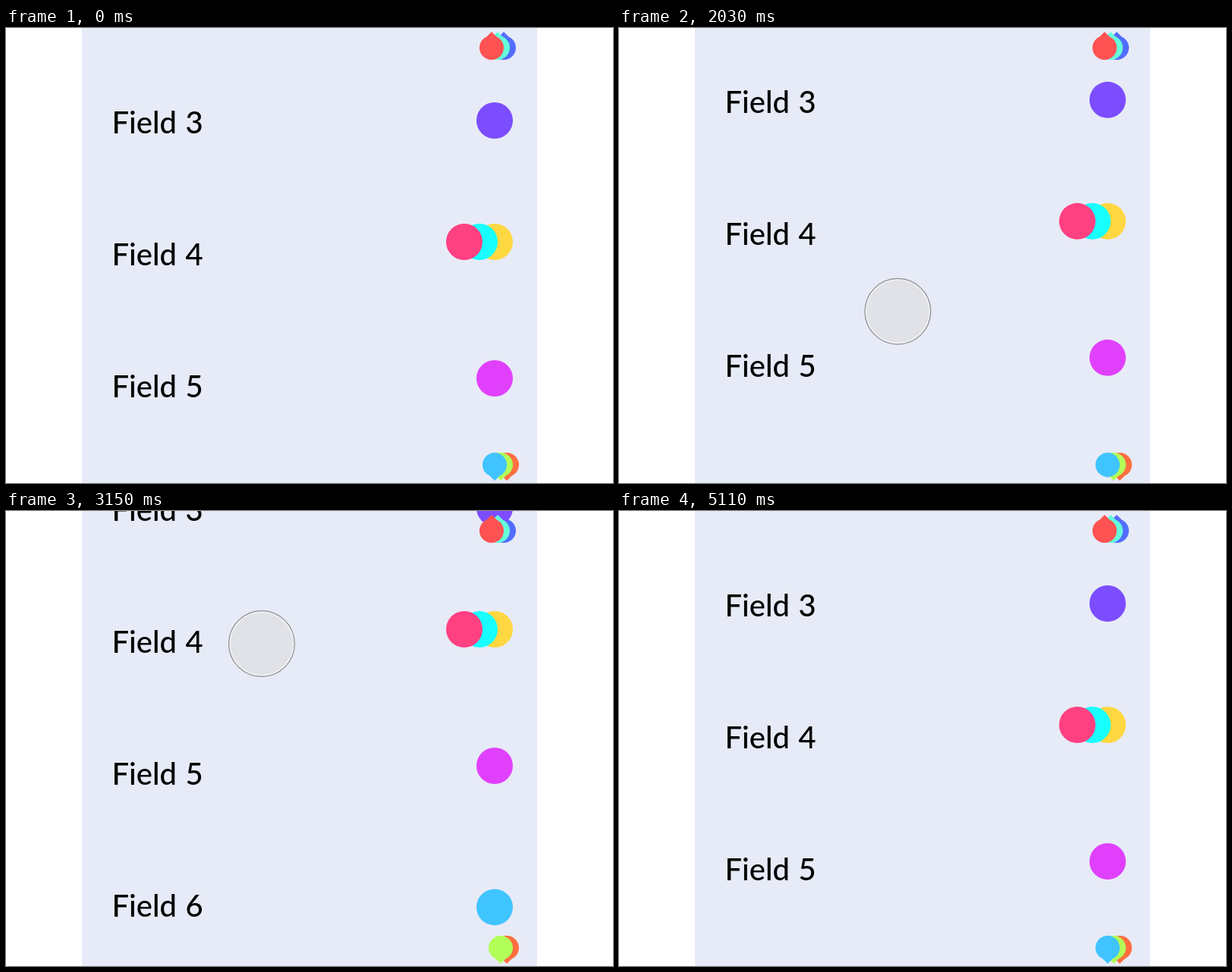
Recreate the animation shown at these times as an HTML page. Size 800 by 600 pixels, loop 6300 ms.

```html
<!DOCTYPE html>
<html lang="en">
<head>
<meta charset="utf-8">
<title>Field list</title>
<style>
  html, body { margin: 0; width: 100%; height: 100%; overflow: hidden; background: #fff; }
  svg { display: block; width: 100vw; height: 100vh; }
  text { font: 500 40px Lato, sans-serif; word-spacing: 1.5px; fill: #000; }
</style>
</head>
<body>
<svg viewBox="0 0 800 600">
  <rect x="100" width="600" height="600" fill="#e7ebf7"/>
  <g class="scroll" id="labels"></g>
  <g id="back"></g>
  <g class="scroll" id="dots"></g>
  <g id="front"></g>
  <g id="touch">
    <circle r="43.4" fill="#ddd" fill-opacity=".62"/>
    <circle r="41.9" fill="none" stroke="#fff" stroke-opacity=".5" stroke-width="2"/>
    <circle r="43.4" fill="none" stroke="#777" stroke-opacity=".8" stroke-width="1.2"/>
  </g>
</svg>
<script>
const LOOP = 6300, TICK = 70;
const PRESS = 1470, RELEASE = 4550, LEAVE = 5110;
const PIN_R = 16, DOT_R = 24, TIP = 21;
const TOP = 26, BOTTOM = 576;

const $ = id => document.getElementById(id);

function add(parent, tag, attrs, text = '') {
  const el = document.createElementNS('http://www.w3.org/2000/svg', tag);
  for (const k in attrs) el.setAttribute(k, attrs[k]);
  el.textContent = text;
  return $(parent).appendChild(el);
}

// Circle of radius r with a right-angled tip reaching up to height h
const drop = (r, h) =>
  `M${-r} 0A${r} ${r} 0 0 1 ${r} 0A${r} ${r} 0 0 1 ${-r} 0ZM-8 ${8 - h}L0 ${-h}L8 ${8 - h}Z`;

const pin = (parent, x, y, fill) => add(parent, 'path', {
  d: drop(PIN_R, TIP), fill, transform: `translate(${x} ${y}) rotate(${y > 300 ? 180 : 0})`
});

const dot = (x, y, fill) => add('dots', 'circle', { cx: x, cy: y, r: DOT_R, fill });

for (let i = 0; i < 4; i++)
  add('labels', 'text', { x: 139.5, y: 139 + 174 * i }, `Field ${i + 3}`);

const backPin = pin('back', 656, TOP, '#536dfe');
dot(644, 122, '#7c4dff');
dot(644, 282, '#ffd740');
dot(624, 282, '#18ffff');
dot(604, 282, '#ff4081');
dot(644, 462, '#e040fb');
pin('front', 648, TOP, '#64ffda');
pin('front', 640, TOP, '#ff5252');
pin('front', 660, BOTTOM, '#ff6e40');
pin('front', 652, BOTTOM, '#b2ff59');
const next = pin('front', 644, BOTTOM, '#40c4ff');

// Monotone cubic interpolation through [input, value] pairs
function curve(pts) {
  const n = pts.length - 1;
  const slope = pts.slice(1).map((p, i) => (p[1] - pts[i][1]) / (p[0] - pts[i][0]));
  const tangent = pts.map((_, i) => {
    const a = slope[i - 1], b = slope[i];
    if (i === 0) return b;
    if (i === n) return a;
    return a * b > 0 ? 2 * a * b / (a + b) : 0;
  });
  return v => {
    if (v <= pts[0][0]) return pts[0][1];
    if (v >= pts[n][0]) return pts[n][1];
    const i = pts.findIndex(p => p[0] > v) - 1;
    const [x0, y0] = pts[i], [x1, y1] = pts[i + 1];
    const h = x1 - x0, u = (v - x0) / h, w = 1 - u;
    return y0 * (1 + 2 * u) * w * w + y1 * u * u * (3 - 2 * u)
      + h * u * w * (tangent[i] * w - tangent[i + 1] * u);
  };
}

const path = [
  [210, 626, 0], [420, 480, 130], [630, 334, 330], [840, 370, 424],
  [1680, 370, 424], [2380, 362, 282], [2450, 360, 262], [2870, 344, 206],
  [3080, 338, 180], [3150, 337, 175], [3500, 337, 175], [3710, 336, 156],
  [4690, 336, 156], [5040, 600, -20]
];
const touchX = curve(path.map(([t, x]) => [t, x]));
const touchY = curve(path.map(([t, , y]) => [t, y]));
const nextY = curve([[0, BOTTOM], [58, BOTTOM], [84.4, 556], [112, 533], [134.7, 516]]);

// Rubber-band drag, then a critically damped return
const band = d => 0.55 * d / (1 + 0.55 * d / 1580);
function scrollAt(t) {
  if (t < PRESS) return 0;
  if (t < RELEASE) return band(424 - touchY(t));
  const k = 0.01537 * (t - RELEASE + 35);
  return t < LEAVE ? band(268) * (1 + k) * Math.exp(-k) : 0;
}

const ramp = (v, a, b) => Math.min(1, Math.max(0, (v - a) / (b - a)));

function draw(t) {
  const s = scrollAt(t);
  for (const g of document.querySelectorAll('.scroll'))
    g.setAttribute('transform', `translate(0 ${-s})`);

  // A dot joins the top stack above the last pin once it passes the pin line
  if (122 - s < TOP) $('back').append(backPin);
  else $('front').prepend(backPin);

  const r = PIN_R + (DOT_R - PIN_R) * ramp(s, 34, 78);
  const h = TIP + (PIN_R - TIP) * ramp(s, 0, 33);
  next.setAttribute('d', drop(r, h));
  next.setAttribute('transform', `translate(644 ${nextY(s)}) rotate(180)`);

  const down = t >= PRESS && t < RELEASE;
  const touch = $('touch');
  touch.setAttribute('visibility', t >= 210 && t < LEAVE ? 'visible' : 'hidden');
  touch.setAttribute('opacity', down ? 1 : 0.5);
  touch.setAttribute('transform',
    `translate(${touchX(t)} ${touchY(t)}) scale(${down ? 1 : 46 / 44})`);
}

const start = performance.now();
function loop(now) {
  const t = Math.max(0, now - start) % LOOP;
  draw(Math.floor(t / TICK) * TICK);
  requestAnimationFrame(loop);
}
draw(0);
requestAnimationFrame(loop);
</script>
</body>
</html>
```
